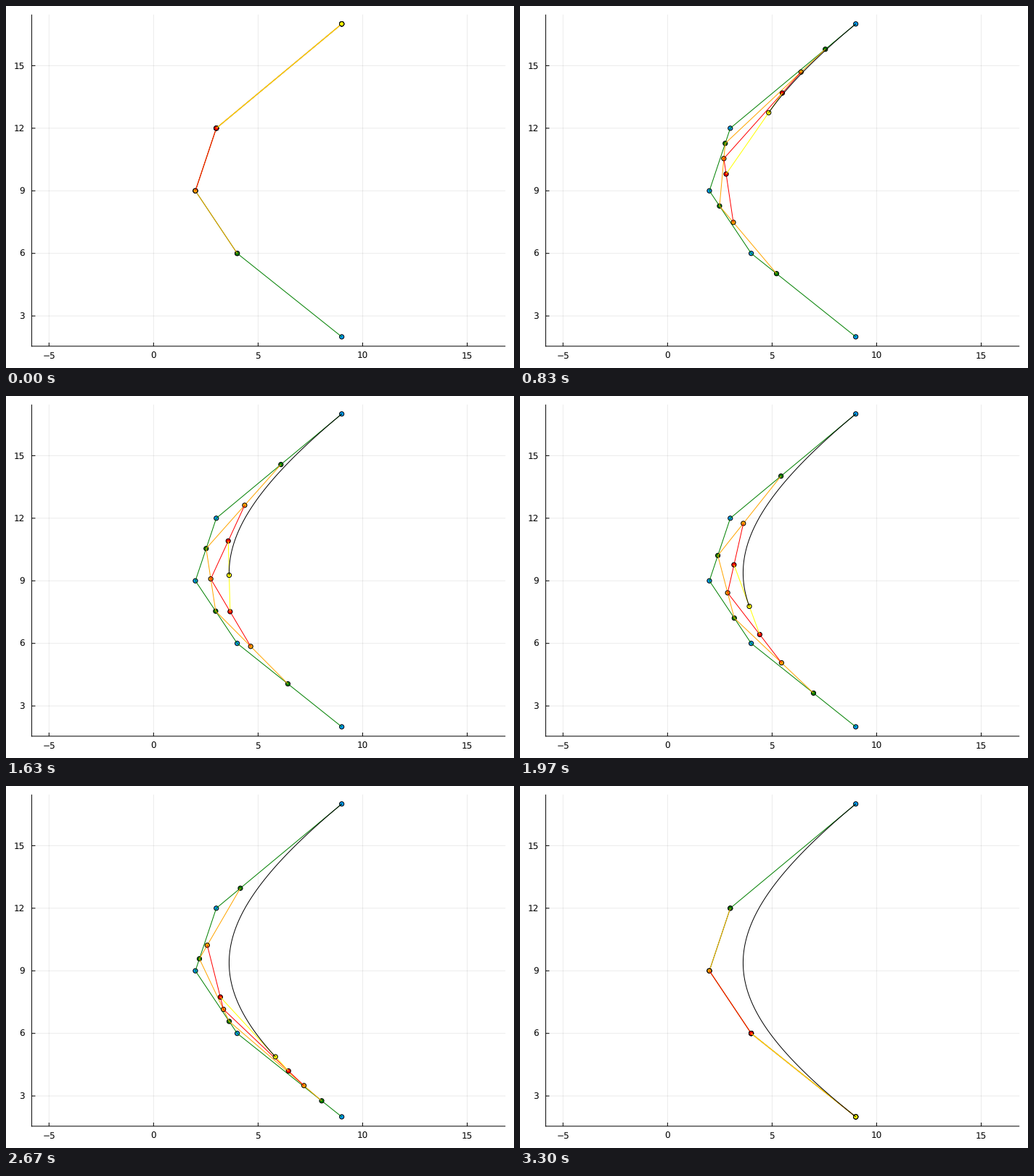
These frames come from a looping animation (700x500 px, 3.33 s). A matplotlib script:

```python
import numpy as np
import matplotlib.pyplot as plt
from matplotlib.animation import FuncAnimation
from matplotlib.patches import Circle

plt.rcParams["text.hinting"] = "none"

W, H = 700, 500
FRAMES = 100
LOOP_MS = 3330
PX = 0.72  # points per pixel at 100 dpi

LEFT, RIGHT, TOP, BOTTOM = 35.4, 688.2, 11.8, 469.9
SCALE = (BOTTOM - TOP) / 15.9  # pixels per data unit

CONTROL = np.array([(9, 17), (3, 12), (2, 9), (4, 6), (9, 2)], float)
MARKER_COLORS = ["#009afa", "green", "orange", "red", "yellow"]
LINE_COLORS = MARKER_COLORS[1:]
RADIUS = 3.1


def px(x):
    return (LEFT + RIGHT) / 2 + (x - 5.5) * SCALE


def py(y):
    return TOP + (17.45 - y) * SCALE


def levels(t):
    """All rows of De Casteljau's scheme, from control points to curve point."""
    rows = [CONTROL]
    while len(rows[-1]) > 1:
        row = rows[-1]
        rows.append((1 - t) * row[:-1] + t * row[1:])
    return rows


fig = plt.figure(figsize=(W / 100, H / 100), dpi=100, facecolor="white")
ax = fig.add_axes([0, 0, 1, 1])
ax.set_xlim(0, W)
ax.set_ylim(H, 0)
ax.axis("off")


def stroke(xs, ys, color, z, **kw):
    return ax.plot(xs, ys, color=color, lw=PX, zorder=z,
                   solid_capstyle="butt", snap=False, **kw)[0]


def label(x, y, value, align):
    ax.text(x, y, str(value).replace("-", "\u2212"), ha=align, va="baseline",
            family="DejaVu Sans", size=12 * PX, color="black")


# Grid, ticks and axis lines
for v in range(-5, 16, 5):
    x = px(v)
    stroke([x, x], [TOP, BOTTOM], "black", 0, alpha=0.08)
    stroke([x, x], [BOTTOM, BOTTOM - 5], "black", 1)
    label(x, 486.5, v, "center")
for v in range(3, 16, 3):
    y = py(v)
    stroke([LEFT, RIGHT], [y, y], "black", 0, alpha=0.08)
    stroke([LEFT, LEFT + 5], [y, y], "black", 1)
    label(26, y + 4.4, v, "right")
stroke([LEFT, LEFT], [TOP, BOTTOM + 0.5], "black", 1)
stroke([LEFT - 0.5, RIGHT], [BOTTOM, BOTTOM], "black", 1)

# Each level's line lies over its own markers
dots = []
for k, color in enumerate(MARKER_COLORS):
    row = [Circle((0, 0), RADIUS, fc=color, ec="black", lw=PX, zorder=2 + 2 * k)
           for _ in range(len(CONTROL) - k)]
    for dot in row:
        ax.add_patch(dot)
    dots.append(row)
lines = [stroke([], [], c, 3 + 2 * k) for k, c in enumerate(LINE_COLORS)]
curve = stroke([], [], "black", 20)

TIMES = np.arange(FRAMES) / (FRAMES - 1)
CURVE = np.array([levels(t)[-1][0] for t in TIMES])


def update(i):
    rows = levels(TIMES[i])
    for row, circles in zip(rows, dots):
        for (x, y), dot in zip(row, circles):
            dot.center = px(x), py(y)
    for row, line in zip(rows, lines):
        line.set_data(px(row[:, 0]), py(row[:, 1]))
    done = CURVE[:i + 1]
    curve.set_data(px(done[:, 0]), py(done[:, 1]))
    return [*lines, curve, *sum(dots, [])]


anim = FuncAnimation(fig, update, frames=FRAMES, interval=LOOP_MS / FRAMES,
                     repeat=True, repeat_delay=0, blit=False)
plt.show()
```
